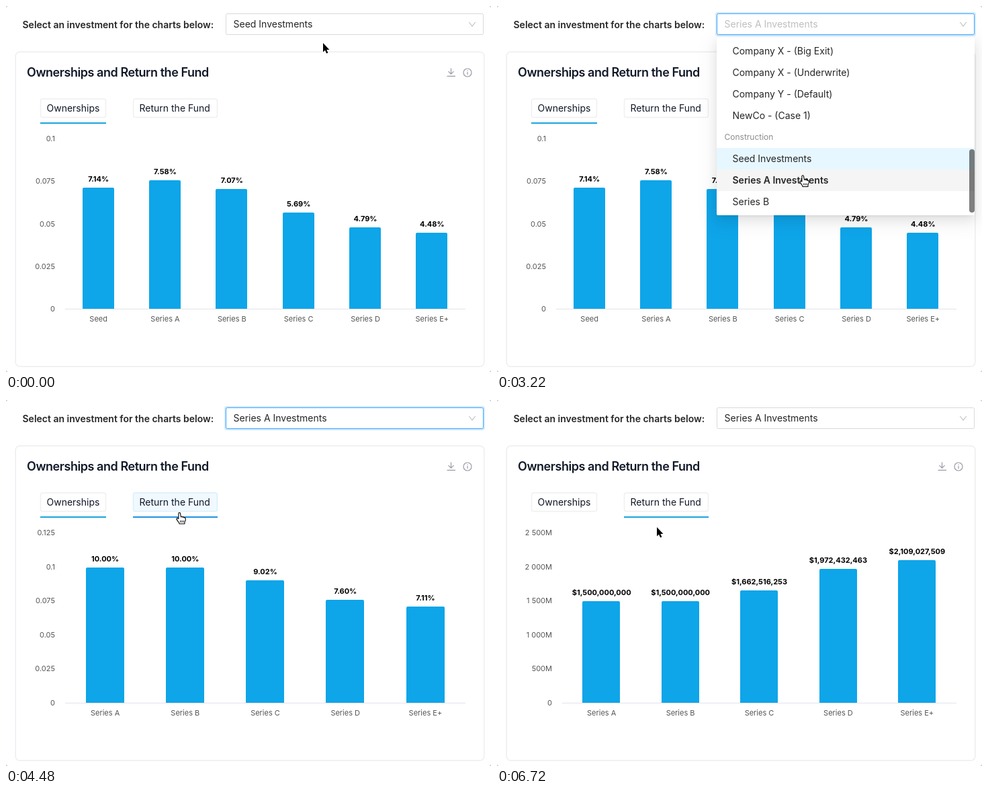
Write an HTML page with a canvas that moves like this. It is 722 by 544 pixels and loops after 7770 ms.

```html
<!DOCTYPE html>
<html lang="en">
<head>
<meta charset="utf-8">
<title>Ownership charts</title>
<style>
  html, body { margin: 0; width: 100%; height: 100%; overflow: hidden; background: #fff; }
  canvas { display: block; }
</style>
</head>
<body>
<canvas id="stage" width="722" height="544"></canvas>
<script>
const ctx = document.getElementById('stage').getContext('2d');
const LOOP = 7770, STEP = 70;
const INK = '#262626', BLUE = '#0ea5e9', FOCUS = '#40a9ff';

const lerp = (a, b, p) => a + (b - a) * p;
const ramp = (t, from, length) => Math.min(1, Math.max(0, (t - from) / length));
const smooth = p => (1 - Math.cos(Math.PI * p)) / 2;
const fade = (t, from, length = 300) => smooth(ramp(t, from, length));
const during = (t, from, to) => t >= from && t < to;
const inside = ([x, y], l, t, r, b) => x >= l && x <= r && y >= t && y <= b;

const eases = {
  hold: () => 0,
  line: p => p,
  in: p => p * p,
  out: p => 1 - (1 - p) ** 2,
  brake: p => 1 - (1 - p) ** 3,
  both: smooth
};

// time, x, y, easing towards the next point
const path = [
  [0, 472, 55, 'hold'], [230, 472, 55, 'both'], [860, 486, 36, 'hold'],
  [1450, 486, 36, 'in'], [1960, 482, 52, 'line'], [2100, 463, 151, 'brake'],
  [2760, 455.5, 252, 'hold'], [3480, 455.5, 252, 'in'], [3780, 435, 248, 'line'],
  [3920, 399, 236, 'out'], [4780, 239, 158, 'hold'], [6180, 239, 158, 'both'],
  [6720, 238, 189, 'hold'], [LOOP, 238, 189, 'hold']
];
const clicks = [[1190, 486, 36], [2940, 455.5, 252], [4970, 239, 158]];

const series = ['Seed', 'Series A', 'Series B', 'Series C', 'Series D', 'Series E+'];
const percent = v => v.toFixed(2) + '%';
const dollars = v => '$' + v.toLocaleString('en-US');
const seed = {
  left: 88, bar: 47, max: 10, cats: series, format: percent,
  values: [7.14, 7.58, 7.07, 5.69, 4.79, 4.48],
  ticks: ['0', '0.025', '0.05', '0.075', '0.1']
};
const seriesA = {
  left: 88, bar: 57, max: 12.5, cats: series.slice(1), format: percent,
  values: [10, 10, 9.02, 7.6, 7.11],
  ticks: [...seed.ticks, '0.125']
};
const fund = {
  left: 97, bar: 56, max: 2.5e9, cats: series.slice(1), format: dollars,
  values: [1500000000, 1500000000, 1662516253, 1972432463, 2109027509],
  ticks: ['0', '500M', '1 000M', '1 500M', '2 000M', '2 500M']
};

const hand = new Path2D('M-1.6 9V1.2Q-1.6-.2-.3-.2T1 1.2L2 6.5Q3.2 5 4.3 6.6Q5.8 5.8 6.6 7.4' +
  'Q8.6 6.9 8.8 9Q9.2 11 7.6 13.5L7.4 16.5H-.6L-.8 15Q-2.5 13-4.6 9.6Q-4.6 7.8-3 8.2Z');
const knuckles = new Path2D('M1.2 11.5v3M3.4 11.5v3M5.6 11.5v3');
const arrow = new Path2D('M0 0V13.5L3 10.7L5.1 15.6L7.4 14.6L5.3 9.9H9.4Z');

function text(str, x, y, { size = 14, weight = 400, color = INK, align = 'left', spacing = 0 } = {}) {
  ctx.font = `${weight} ${size}px Inter, sans-serif`;
  ctx.letterSpacing = spacing + 'px';
  ctx.textAlign = align;
  ctx.fillStyle = color;
  ctx.fillText(str, x, y);
}

function fill(color, x, y, w, h, r = 0) {
  ctx.fillStyle = color;
  ctx.beginPath();
  ctx.roundRect(x, y, w, h, r);
  ctx.fill();
}

function frame(color, x, y, w, h, r, width = 1) {
  ctx.beginPath();
  ctx.roundRect(x, y, w, h, r);
  stroke(color, width);
}

function stroke(color, width, shape) {
  ctx.strokeStyle = color;
  ctx.lineWidth = width;
  shape ? ctx.stroke(shape) : ctx.stroke();
}

function withAlpha(alpha, draw) {
  if (alpha <= 0) return;
  ctx.save();
  ctx.globalAlpha *= alpha;
  draw();
  ctx.restore();
}

function pointer(t) {
  let i = path.length - 2;
  while (path[i][0] > t) i--;
  const [t0, x0, y0, ease] = path[i], [t1, x1, y1] = path[i + 1];
  const p = eases[ease]((t - t0) / (t1 - t0));
  return [lerp(x0, x1, p), lerp(y0, y1, p)];
}

function drawSelect(t) {
  const focus = fade(t, 1230) - fade(t, 4950);
  const lit = Math.max(focus, t < 4900 ? fade(t, 500) : 0);
  text('Select an investment for the charts below:', 24.5, 33, { weight: 600 });
  withAlpha(focus * 0.2, () => frame('#1890ff', 326, 10, 386, 34, 3, 2));
  fill('#fff', 327, 11, 384, 32, 2);
  frame('#d9d9d9', 327.5, 11.5, 383, 31, 2);
  withAlpha(lit, () => frame(FOCUS, 327.5, 11.5, 383, 31, 2));
  text(t < 3150 ? 'Seed Investments' : 'Series A Investments', 338.5, 32,
    { color: during(t, 1330, 3290) ? '#bfbfbf' : INK });
  stroke('#bfbfbf', 1.1, new Path2D('M689.3 24L694 30L698.7 24'));
}

function drawTab(label, x, w, hover, active) {
  fill(hover ? '#f0f9ff' : '#fff', x, 137.5, w, 28, 3);
  frame(hover ? '#dcf0fb' : '#f0f0f2', x + 0.5, 138, w - 1, 27.5, 3, 1.5);
  text(label, x + 9.5, 157, { color: '#111827' });
  if (active || hover) fill(active ? '#1ca3de' : '#2094e0', x, 173, w, 2);
}

function drawCard(t, pos) {
  frame('#eeeef0', 14.25, 68.25, 697.5, 467.5, 6, 1.5);
  text('Ownerships and Return the Fund', 31, 105,
    { size: 18, weight: 600, color: '#111827', spacing: -0.45 });
  stroke('#9a9aa5', 1.2, new Path2D('M662.5 92.5V101M658.5 97.2L662.5 101.2L666.5 97.2M656.5 104.3H669'));
  stroke('#9a9aa5', 1.2, new Path2D('M693 99a6 6 0 1 1-12 0a6 6 0 1 1 12 0M687 98V102.3M687 95.6V96.8'));
  const switched = t >= 5180;
  const hover = t > 3500 && inside(pos, 189, 137, 315, 175);
  drawTab('Ownerships', 51, 98, false, !switched);
  drawTab('Return the Fund', 189, 126, hover, switched);
}

function column(chart, i) {
  const slot = (684 - chart.left) / chart.values.length;
  return {
    mid: chart.left + slot * (i + 0.5),
    top: 450 - 252 * chart.values[i] / chart.max,
    width: chart.bar
  };
}

const tickY = (chart, i) => 450 - 253 * i / (chart.ticks.length - 1);

function drawChart(from, to, p) {
  const small = { size: 11, color: '#555' };
  const left = lerp(from.left, to.left, p);
  fill('#e2e4ea', left, 450, 684 - left, 1);
  to.ticks.forEach((label, i) => {
    const old = from.ticks.indexOf(label);
    const y = tickY(to, i);
    withAlpha(old < 0 ? p : 1, () => text(label, left - 15,
      (old < 0 ? y : lerp(tickY(from, old), y, p)) + 4, { ...small, align: 'right' }));
  });
  to.values.forEach((value, i) => {
    const a = column(from, i), b = column(to, i);
    const mid = lerp(a.mid, b.mid, p), width = lerp(a.width, b.width, p);
    const top = Math.round(lerp(a.top, b.top, p) + 0.2);
    fill(BLUE, Math.round(mid - width / 2 - 0.4), top, Math.round(width), 450 - top, [2, 2, 0, 0]);
    text(to.cats[i], mid, 469, { ...small, align: 'center' });
    text(to.format(value), mid, top - 9, { size: 11, weight: 700, color: '#000', align: 'center' });
  });
}

function shadow(dy, blur, spread, alpha) {
  ctx.save();
  ctx.shadowColor = `rgba(0,0,0,${alpha})`;
  ctx.shadowBlur = blur;
  ctx.shadowOffsetX = 2000;
  ctx.shadowOffsetY = dy;
  fill('#000', 327 - 2000 - spread, 47 - spread, 384 + 2 * spread, 264 + 2 * spread, 2);
  ctx.restore();
}

function drawMenu(t) {
  const open = 1 - (1 - ramp(t, 1250, 200)) ** 5 - ramp(t, 3215, 200) ** 5;
  withAlpha(open, () => {
    ctx.translate(0, 47);
    ctx.scale(1, 0.8 + 0.2 * open);
    ctx.translate(0, -47);
    shadow(3, 6, -4, 0.12);
    shadow(6, 16, 0, 0.08);
    shadow(9, 28, 8, 0.05);
    fill('#fff', 327, 47, 384, 264, 2);
    const swap = fade(t, 3200);
    withAlpha(1 - swap, () => fill('#e6f7ff', 327, 211, 384, 32));
    withAlpha(fade(t, 2330), () => fill('#f5f5f5', 327, 243, 384, 32));
    withAlpha(swap, () => fill('#e6f7ff', 327, 243, 384, 32));
    const chosen = t < 3150 ? 5 : 6;
    ['Company X - (Big Exit)', 'Company X - (Underwrite)', 'Company Y - (Default)', 'NewCo - (Case 1)',
      'Construction', 'Seed Investments', 'Series A Investments', 'Series B'].forEach((label, i) => {
      if (i === 4) text(label, 338.5, 199, { size: 12, color: '#8c8c8c' });
      else text(label, 350.5, 72 + 32 * i, { weight: i === chosen ? 600 : 400 });
    });
    fill('rgba(0,0,0,.5)', 703, 213, 8, 94, 4);
  });
}

function drawPointer(t, pos) {
  const overHot = inside(pos, 327, 11, 711, 43) ||
    (during(t, 1250, 3430) && inside(pos, 327, 43, 711, 311)) ||
    inside(pos, 189, 137, 315, 175);
  ctx.save();
  ctx.translate(...pos);
  ctx.lineJoin = 'round';
  if (overHot) {
    ctx.fillStyle = '#fff';
    ctx.fill(hand);
    stroke('#000', 1.1, hand);
    stroke('#000', 0.9, knuckles);
  } else {
    stroke('#fff', 2.2, arrow);
    ctx.fillStyle = '#000';
    ctx.fill(arrow);
  }
  ctx.restore();
  for (const [start, x, y] of clicks) {
    if (!during(t, start, start + 210)) continue;
    ctx.beginPath();
    ctx.arc(x, y, 29, 0, 2 * Math.PI);
    stroke('#fff', 5.5);
    stroke('#000', 3);
  }
}

function draw(t) {
  const pos = pointer(t);
  fill('#c4c4c4', 0, 0, 722, 544);
  fill('#fff', 0, 0, 722, 544, 4);
  drawCard(t, pos);
  if (t < 5130) drawChart(seed, t < 3260 ? seed : seriesA, fade(t, 3260, 500));
  else drawChart(seriesA, fund, fade(t, 5130, 450));
  drawMenu(t);
  drawSelect(t);
  drawPointer(t, pos);
}

const begin = performance.now();
function tick() {
  const t = (performance.now() - begin) % LOOP;
  draw(Math.floor(t / STEP) * STEP);
  requestAnimationFrame(tick);
}
tick();
</script>
</body>
</html>
```
